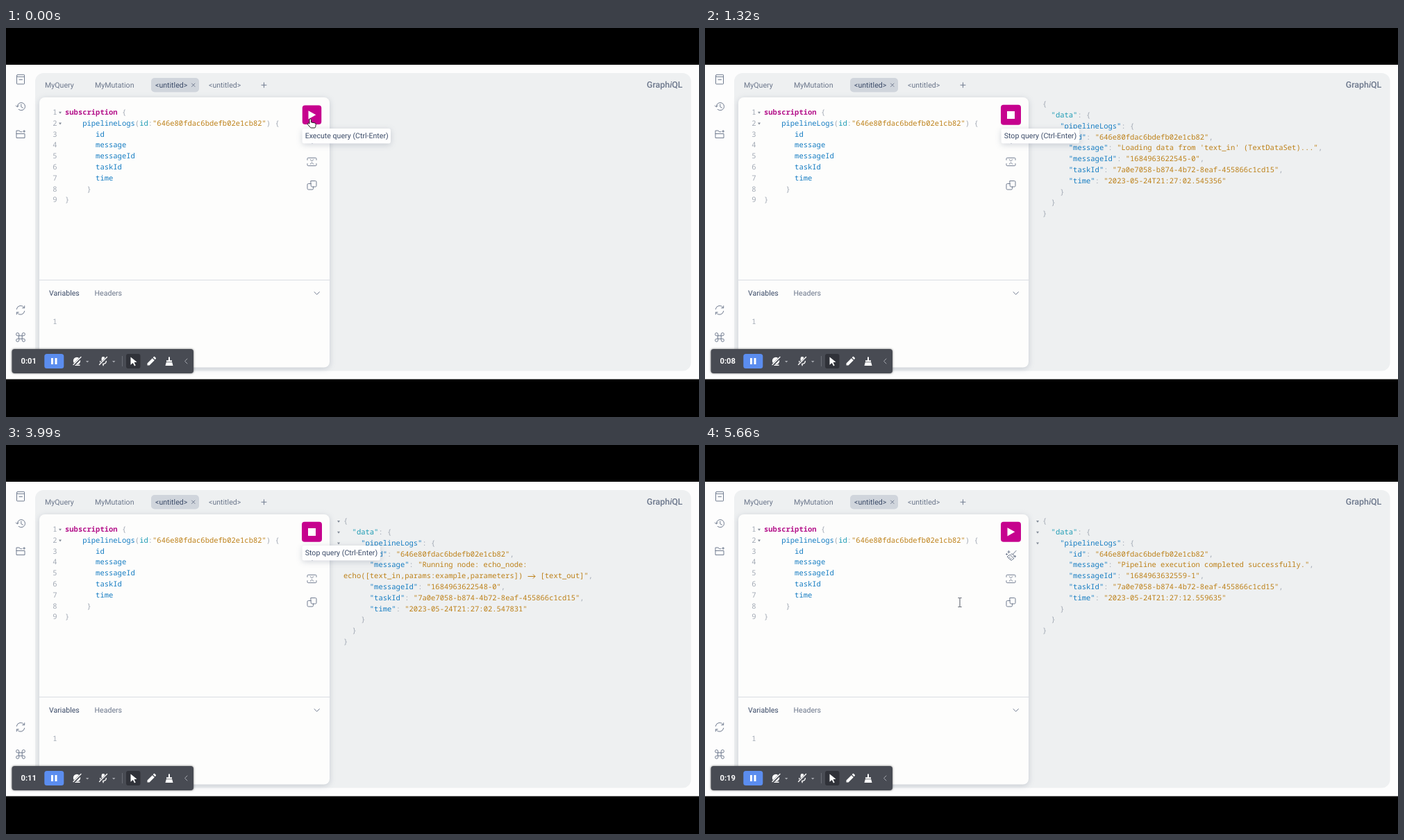
Recreate the animation shown at these times as an HTML page. Size 998 by 561 pixels, loop 5700 ms.

```html
<!DOCTYPE html>
<html lang="en">
<head>
<meta charset="utf-8">
<title>Subscription in GraphiQL</title>
<style>
  html, body { margin: 0; width: 100%; height: 100%; overflow: hidden; background: #000; }
  body { position: relative; text-rendering: geometricPrecision; }
  svg { position: absolute; left: 0; top: 0; }
  text { font: 10.6px Roboto, sans-serif; fill: #6b768b; }
  text.dark { fill: #3b4b68; }
  text.logo { font-size: 12.4px; font-weight: 500; }
  text.clock { font-size: 11.2px; font-weight: 700; fill: #fff; }
  pre { position: absolute; margin: 0; font: 10.5px/15.8px "Noto Sans Mono", monospace; color: #a3aab5; }
  pre b { font-weight: 600; color: #b4128a; }
  pre i { font-style: normal; color: #147cc2; }
  pre u { text-decoration: none; color: #1c9bb4; }
  pre s { text-decoration: none; color: #bd8018; }
  .line { fill: none; stroke: #717c90; stroke-width: 1; stroke-linecap: round; stroke-linejoin: round; }
  .fold { fill: #848c99; }
  .shadow { filter: drop-shadow(0 2px 4px #3b4b6838); }
  .bar { fill: #484b53; filter: drop-shadow(0 0 1.5px #0008); }
  #spinner { position: absolute; left: 705.2px; top: 108.7px; width: 34.5px; height: 34.5px;
    border: 3px solid transparent; border-top-color: #989ca5; border-radius: 50%; }
</style>
</head>
<body>
<svg width="998" height="561">
  <path fill="#fdfdfd" d="M0 53h998v453.5H0z"/>
  <rect x="42" y="65" width="944.5" height="429.5" rx="12" fill="#eef0f1"/>
  <rect class="shadow" x="48" y="100" width="418" height="389.5" rx="8" fill="#fdfdfc"/>
  <path stroke="#d9dde3" d="M48 363.5h418"/>

  <rect x="209" y="72" width="69" height="20.5" rx="5" fill="#d0d5dc"/>
  <text x="56" y="85.7">MyQuery</text>
  <text x="128" y="85.7">MyMutation</text>
  <text class="dark" x="215" y="85.7">&lt;untitled&gt;</text>
  <text x="292" y="85.7">&lt;untitled&gt;</text>
  <text class="logo" x="922.7" y="86.2">Graph<tspan font-style="italic">i</tspan>QL</text>
  <text class="dark" x="62" y="386.4">Variables</text>
  <text x="127.5" y="386.4">Headers</text>

  <g class="line">
    <path d="M267.5 80l4.5 4.5m0-4.5l-4.5 4.5M368 82.3h7m-3.5-3.5v7M444 380.7l3.7 3.6 3.7-3.6"/>
    <!-- sidebar -->
    <path d="M26.5 70.3H17q-1.5 0-1.5-1.5t1.5-1.5h8.7q.8 0 .8.8v12q0 .8-.8.8h-9.4q-.8 0-.8-.8V68.8M19 74.6h4.5"/>
    <path d="M16.3 113.2a5.6 5.6 0 1 1 2 4.3M14.3 112l2 2 2.2-2M21.8 110v3.7l2.6 1.4"/>
    <path d="M23 149.8h-2.4l-1.4-1.8h-4.2v10.5h12v-6H15m9.6-3.5h3m-1.5-1.5v3"/>
    <path d="M15.2 405.5a6 6 0 0 1 11-2.2m.5-2.5v3h-3M26.8 408.3a6 6 0 0 1-11 2.2m-.5 2.5v-3h3"/>
    <path d="M18.8 443.8h4.4v4.4h-4.4zm0 0h-2a2.1 2.1 0 1 1 2-2zm4.4 0v-2a2.1 2.1 0 1 1 2 2zm0 4.4h2a2.1 2.1 0 1 1-2 2zm-4.4 0v2a2.1 2.1 0 1 1-2-2z"/>
    <!-- editor tools -->
    <path d="M448 152.5l-5.2 5.7m-3.4.2l5.4 5.2m-4-6.4q2-.6 3.3.6t.7 3.2M439.4 158.4l-4.4 2.6 6 5.5 3.8-2.9M437.5 163l1.8-1.8m.2 3.6l1.8-1.8M437.5 152.5v3.4m-1.7-1.7h3.4M434.5 156.5v2m-1-1h2M446.5 159.5v2.4m-1.2-1.2h2.4"/>
    <path d="M434 190.3v-1.7q0-1.3 1.3-1.3h10.4q1.3 0 1.3 1.3v1.7m0 5.4v1.7q0 1.3-1.3 1.3h-10.4q-1.3 0-1.3-1.3v-1.7M438.3 189.8l2.2 2 2.2-2m-4.4 6.4l2.2-2 2.2 2"/>
    <path d="M439.2 220.5h6.3q1.5 0 1.5 1.5v5.5q0 1.5-1.5 1.5h-5q-1.3 0-1.3-1.5zm0 4h-3.7q-1.5 0-1.5 1.5v5.5q0 1.5 1.5 1.5h5.5q1.5 0 1.5-1.5V229"/>
  </g>
  <path class="fold" d="M76 120.7h4l-2 3zM76 136.5h4l-2 3z"/>
  <path class="fold" id="folds" d="M477 109h4l-2 3zm0 15.8h4l-2 3zm0 15.8h4l-2 3z"/>
  <rect id="button" fill="#c6028e"/>
  <path id="symbol" fill="#fff"/>
</svg>

<pre style="left:67.2px;top:115px">1
2
3
4
5
6
7
8
9</pre>
<pre style="left:67.2px;top:416.6px">1</pre>
<pre style="left:85px;top:115px"><b>subscription</b> {
    <i>pipelineLogs</i>(<u>id</u>:<s>"646e80fdac6bdefb02e1cb82"</s>) {
       <i>id</i>
       <i>message</i>
       <i>messageId</i>
       <i>taskId</i>
       <i>time</i>
     }
}</pre>
<pre id="response" style="left:486px;top:103.3px"></pre>
<div id="spinner"></div>

<svg width="998" height="561">
  <path id="arrow" d="M751.5 189.5h10.5m-3-3l3 3-3 3" fill="none" stroke="#bd8018"/>
  <g id="tip">
    <rect class="shadow" id="tipBox" x="426.5" y="145" height="21.5" rx="3" fill="#fefefe"/>
    <text class="dark" id="tipText" x="430.7" y="159.4"></text>
  </g>

  <!-- recorder bar -->
  <rect class="bar" x="8.5" y="463" width="261.5" height="35" rx="4"/>
  <text class="clock" id="clock" x="21.5" y="484.3"></text>
  <rect x="55.3" y="470" width="28" height="21" rx="3.5" fill="#5b8def"/>
  <rect x="173" y="470" width="20.5" height="21" rx="3" fill="#303239"/>
  <path stroke="#6a6d75" d="M167.5 473v15"/>
  <g fill="#fff">
    <path d="M65 476h3v9h-3zm5.5 0h3v9h-3z"/>
    <circle cx="102" cy="480" r="5.2"/>
    <path d="M97.5 485.5h9v1.5h-9z"/>
    <rect x="137.6" y="474" width="4.8" height="8.3" rx="2.4"/>
    <path d="M135 480h1.3a3.7 3.7 0 0 0 7.4 0h1.3a5 5 0 0 1-4.3 5v2.3h-1.4V485a5 5 0 0 1-4.3-5z"/>
    <path d="M179.5 474.5l9 7.2-4 .5 2.2 4.3-1.7.9-2.2-4.4-3.3 2.7z"/>
    <path d="M203.5 486.5v-3l7.3-7.3 3 3-7.3 7.3zm8.2-11.2l1.2-1.2q.6-.5 1.2 0l1.7 1.7q.6.6 0 1.2l-1.2 1.2z"/>
    <path d="M234 474.5h2v4.7h3v2.3h-8v-2.3h3zm-3.3 7.7h8.6l1.2 4.8h-11z"/>
  </g>
  <g fill="none" stroke-linecap="round">
    <path d="M97 486.5l11-11M134.5 486.5l11-11" stroke="#484b53" stroke-width="3.2"/>
    <path d="M97 485.5l11-11M134.5 485.5l11-11" stroke="#fff" stroke-width="1.3"/>
    <path d="M261 477l-3.5 3.5 3.5 3.5" stroke="#a5a8af"/>
  </g>
  <path fill="#a5a8af" d="M115 480h4.4l-2.2 2.6zm38 0h4.4l-2.2 2.6z"/>

  <path id="hand" fill="#fff" stroke="#222" d="M-3.5-5.5q0-1.5 1.3-1.5t1.3 1.5V-2l5 .9q1.9.4 1.7 2.2L5.2 4.5Q5 6 3.7 6H-.8q-1 0-1.7-.9l-3.6-4.2q-.4-1 .4-1.5.8-.4 1.6.3l.6.5z"/>
  <path id="beam" fill="none" stroke="#555b66" d="M-2.5-6.5h2L0-6l.5-.5h2M0-6V6m-2.5.5h2L0 6l.5.5h2"/>
</svg>

<script>
const LOOP = 5700, CLICK = 560, REPLY = 1240, SECOND = 1400, DONE = 4240, MOVE = 5380, REST = 5620;
const $ = id => document.getElementById(id);
const show = (id, on) => $(id).style.display = on ? "" : "none";
const set = (id, attrs) => { for (const name in attrs) $(id).setAttribute(name, attrs[name]); };
const latest = (steps, t) => steps.filter(([from]) => from <= t).pop()[1];

const field = (name, value) => `      <i>"${name}"</i>: <s>"${value}"</s>`;
const reply = (message, messageId, time) => `{
  <u>"data"</u>: {
    <i>"pipelineLogs"</i>: {
${[
  field("id", "646e80fdac6bdefb02e1cb82"),
  field("message", message),
  field("messageId", messageId),
  field("taskId", "7a0e7058-b874-4b72-8eaf-455866c1cd15"),
  field("time", time)
].join(",\n")}
    }
  }
}`;

const replies = [
  [0, ""],
  [REPLY, reply("Loading data from 'text_in' (TextDataSet)...", "1684963622545-0", "2023-05-24T21:27:02.545356")],
  // the gap after "])" holds the drawn arrow
  [SECOND, reply("Running node: echo_node:\necho([text_in,params:example,parameters])    [text_out]",
    "1684963622548-0", "2023-05-24T21:27:02.547831")],
  [DONE, reply("Pipeline execution completed successfully.", "1684963632559-1", "2023-05-24T21:27:12.559635")]
];
const seconds = [[0, 1], [400, 2], [REPLY, 8], [1990, 9], [2990, 10], [3990, 11], [DONE, 18], [5300, 19]];

let shown;
function draw(t) {
  const running = t >= CLICK && t < DONE;
  const text = latest(replies, t);
  if (text !== shown) $("response").innerHTML = shown = text;
  $("clock").textContent = "0:" + String(latest(seconds, t)).padStart(2, "0");

  // the focus ring makes the button slightly larger after the click
  const size = t < CLICK ? 27.5 : 29;
  set("button", { x: 440.5 - size / 2, y: 125.2 - size / 2, width: size, height: size, rx: 4 });
  set("symbol", { d: running ? "M435 120h11v11h-11z" : "M435.5 119.2l10.8 6.1-10.8 6.1z" });

  show("spinner", t >= CLICK && t < REPLY);
  $("spinner").style.transform = `rotate(${(t - CLICK) / 800}turn)`;
  show("arrow", t >= SECOND && t < DONE);
  show("folds", t >= 2000 && t < DONE || t >= 4900);

  const p = Math.min(1, Math.max(0, (t - MOVE) / (REST - MOVE)));
  const ease = p * p * (3 - 2 * p);
  const x = 440.5 - 73.5 * ease, y = 138 + 89 * ease;
  const onButton = y < 140;
  const visible = t < REPLY || t >= MOVE;
  show("hand", visible && onButton);
  show("beam", visible && !onButton);
  for (const id of ["hand", "beam"]) set(id, { transform: `translate(${x} ${y})` });

  show("tip", onButton && (t < CLICK || t >= REPLY));
  set("tipBox", { width: running ? 112.5 : 127.5 });
  $("tipText").textContent = (running ? "Stop" : "Execute") + " query (Ctrl-Enter)";
}

let start;
function tick(now) {
  start ??= now;
  draw((now - start) % LOOP);
  requestAnimationFrame(tick);
}
draw(0);
requestAnimationFrame(tick);
</script>
</body>
</html>
```
